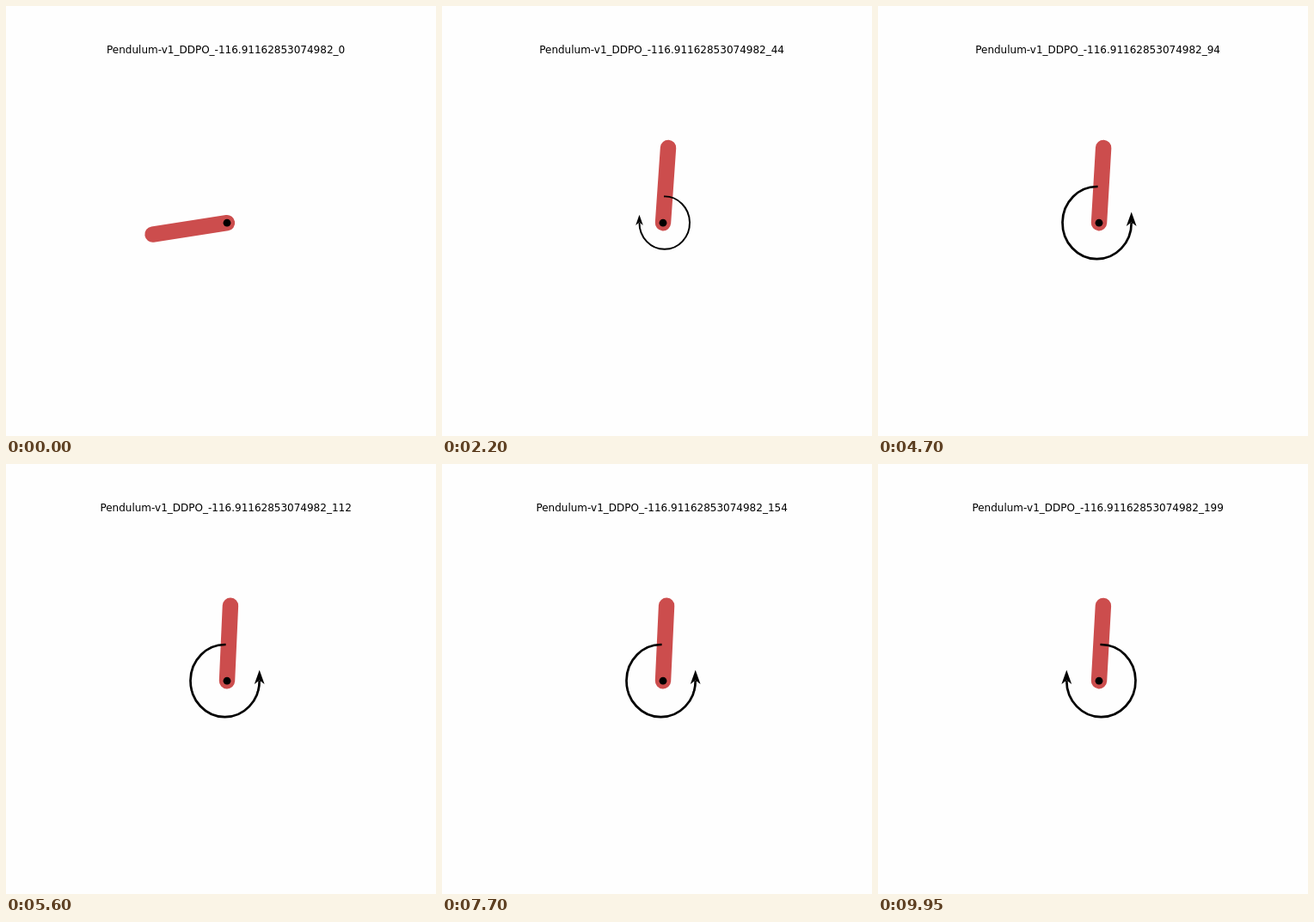
An HTML page that plays this animation: 500 by 500 pixels, repeating every 10 s.

```html
<!DOCTYPE html>
<html lang="en">
<head>
<meta charset="utf-8">
<title>Pendulum</title>
<style>
  html, body { margin: 0; width: 100%; height: 100%; overflow: hidden; background: #fefefe; }
  svg { display: block; width: 500px; height: 500px; }
  text { font: 12px "DejaVu Sans", sans-serif; text-anchor: middle; }
</style>
</head>
<body>
<svg viewBox="0 0 500 500">
  <text id="title" x="255.6" y="55"></text>
  <g transform="translate(257 252.2)">
    <path id="rod" d="M0 0V-87.5" stroke="#cc4d4d" stroke-width="18.4" stroke-linecap="round"/>
    <g id="torque">
      <path d="M-1.4-42.2A40.1 42.1 0 1 0 37.7-.2" fill="none" stroke="#000" stroke-width="2.7"/>
      <path d="M37.7-12.8L43.6 3.7 37.7-.8 31.8 3.7Z"/>
    </g>
    <circle r="4.4"/>
  </g>
</svg>
<script>
const STEP = 50, COUNT = 200, SETTLED = 24;
const REST = 2 * Math.PI - 0.057, GAIN = 4.5;
const title = document.getElementById('title');
const rod = document.getElementById('rod');
const torque = document.getElementById('torque');
const clamp = u => Math.max(-2, Math.min(2, u));

// Swing-up: angle 0 is upright, counterclockwise positive, dt = 0.05.
function swing(steps) {
  const states = [{ angle: 1.724, u: 0 }];
  let angle = 1.724, speed = 0.2;
  for (let i = 1; i < steps; i++) {
    const pull = 0.75 * Math.sin(angle);
    const u = clamp((GAIN * (REST - angle) - speed - pull) / 0.15);
    speed += pull + 0.15 * u;
    angle += 0.05 * speed;
    states.push({ angle, u });
  }
  return states;
}

const states = swing(SETTLED);
const gap = states[SETTLED - 1].angle - REST;

// Balancing: torque flips almost every step, the rod trembles around rest.
for (let n = SETTLED; n < COUNT; n++) {
  const phase = (n * 0.43 + 0.06) % 1;
  const u = phase < 0.57 ? 2 : clamp((phase - 1) * 73);
  const drift = 0.008 * Math.cos(2 * Math.PI * (n - 112) / 47);
  const decay = gap * (1 - 0.05 * GAIN) ** (n - SETTLED + 1);
  states.push({ angle: REST + drift + 0.004 * Math.sign(u) + decay, u });
}

let shown = -1;
function draw() {
  const n = Math.floor(performance.now() / STEP) % COUNT;
  if (n !== shown) {
    shown = n;
    const { angle, u } = states[n];
    title.textContent = `Pendulum-v1_DDPO_-116.91162853074982_${n}`;
    rod.setAttribute('transform', `rotate(${-angle * 180 / Math.PI})`);
    torque.setAttribute('visibility', n ? 'visible' : 'hidden');
    torque.setAttribute('transform', `scale(${u / 2} ${Math.abs(u) / 2})`);
  }
  requestAnimationFrame(draw);
}
draw();
</script>
</body>
</html>
```
